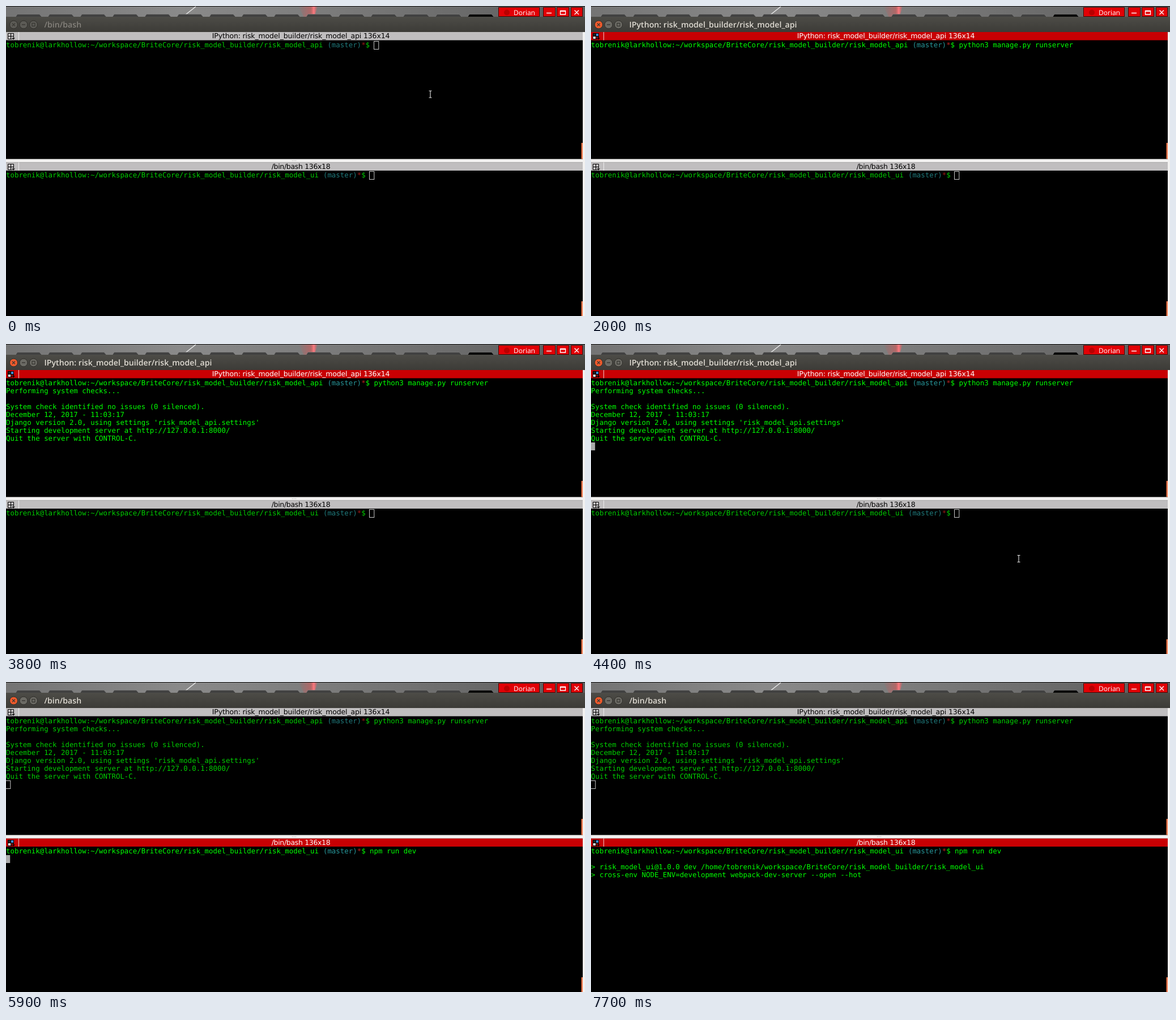
An HTML page for the animation above (8000 ms loop, 1022x548 px).

```html
<!DOCTYPE html>
<html lang="en">
<head>
<meta charset="utf-8">
<title>Two terminals</title>
<style>
  html, body { margin: 0; width: 100%; height: 100%; overflow: hidden; background: #000; }
  svg { display: block; width: 1022px; height: 548px; }
  text { white-space: pre; text-rendering: geometricPrecision; }

  .pane { --fg: #00cd00; --branch: #1f7a7c; --dirty: #a01818; --bar: #c0bebf; --ink: #000; --rule: #eee; }
  .pane.on { --fg: #00ff00; --branch: #27979a; --dirty: #c82020; --bar: #c80003; --ink: #fff; --rule: #f3c9c9; }
  .bar { fill: var(--bar); }
  .name { font: 12.44px "DejaVu Sans", sans-serif; fill: var(--ink); text-anchor: middle; }
  .term { font: 12.4px "DejaVu Sans Mono", monospace; fill: var(--fg); }
  .branch { fill: var(--branch); }
  .dirty { fill: var(--dirty); }
  .cursor { fill: #aaa; }
  .cursor.hollow { fill: none; stroke: #c8c8c8; }
  .cell { fill: none; stroke: #000; }
  .on .blue { fill: #3d8fe0; }
  .on .white { fill: #fff; }
  .on .dark { fill: #222; }

  #title { font: 600 14.15px "Open Sans", sans-serif; fill: #dfdbd2; }
  .button { fill: #6c6b65; stroke: #2f2e2a; }
  .glyph { fill: none; stroke: #3a3934; stroke-width: 1.3; }
  .close { fill: #ee5a2c; }
  .idle #title { fill: #85827c; }
  .idle .button { fill: #5c5b56; }
  .user { font: 12px "Open Sans", sans-serif; fill: #fff; }
</style>
</head>
<body>
<svg viewBox="0 0 1022 548">
  <defs>
    <linearGradient id="desk">
      <stop offset="0" stop-color="#747474"/>
      <stop offset=".3" stop-color="#8a8a8a"/>
      <stop offset=".55" stop-color="#7c7c7c"/>
      <stop offset="1" stop-color="#5c5c5c"/>
    </linearGradient>
    <linearGradient id="glow">
      <stop offset="0" stop-color="#d05050" stop-opacity="0"/>
      <stop offset=".65" stop-color="#d45a5a" stop-opacity=".6"/>
      <stop offset=".8" stop-color="#ff7a80"/>
      <stop offset="1" stop-color="#e05a60" stop-opacity=".1"/>
    </linearGradient>
    <linearGradient id="frame" x2="0" y2="1">
      <stop offset="0" stop-color="#4d4c47"/>
      <stop offset="1" stop-color="#3c3b37"/>
    </linearGradient>
  </defs>

  <rect width="1022" height="548" fill="#000"/>
  <rect width="1022" height="20" fill="url(#desk)"/>
  <rect width="1022" height="1" fill="#111"/>
  <path d="M516 1H550L544 20H526Z" fill="url(#glow)"/>
  <path d="M311 20L335 1" stroke="#eee" stroke-width="1.3"/>
  <g id="keys" stroke="#8c8c8c" stroke-width=".5"></g>

  <g fill="#e20006" stroke="#4a0000">
    <rect x="869.5" y="2.5" width="72" height="16"/>
    <rect x="948.5" y="2.5" width="21" height="16"/>
    <rect x="972.5" y="2.5" width="21" height="16"/>
    <rect x="997.5" y="2.5" width="20" height="16"/>
  </g>
  <circle cx="884" cy="11.5" r="5" fill="#b80000"/>
  <text class="user" x="896" y="16">Dorian</text>
  <path d="M954 12.5H963M978.5 8.5H987.5V15H978.5ZM978 9.2H988M1003.5 7.5L1011 15M1011 7.5L1003.5 15"
        fill="none" stroke="#fff" stroke-width="1.4"/>

  <g id="window">
    <rect y="19" width="1022" height="27" fill="url(#frame)"/>
    <circle id="close" class="button" cx="13.5" cy="33" r="7"/>
    <circle class="button" cx="31" cy="33" r="7"/>
    <circle class="button" cx="48.5" cy="33" r="7"/>
    <path class="glyph" d="M11 30.5L16 35.5M16 30.5L11 35.5M28 33H34M46 30.5H51V35.5H46Z"/>
    <text id="title" x="67.5" y="38"></text>
  </g>

  <g id="panes"></g>

  <path d="M1018 46H1022V548H1018ZM0 270.5H1022V276.5H0Z" fill="#f2f1f0"/>
  <path d="M505 273.5H513" stroke="#aaa" stroke-dasharray="1 1.5"/>
  <path d="M1015.5 242H1018V270.5H1015.5ZM1015.5 522H1018V548H1015.5Z" fill="#f0774a"/>

  <path id="mouse" d="M-2.5 -6H-.6L0 -5.4L.6 -6H2.5M0 -5.4V5.4M-2.5 6H-.6L0 5.4L.6 6H2.5"
        fill="none" stroke="#e6e6e6" stroke-width="1.1"/>
</svg>

<script>
const LOOP = 8000, CHAR = 7.466, ROW = 14;
const HOME = "/workspace/BriteCore/risk_model_builder/";
const API = "IPython: risk_model_builder/risk_model_api";
const $ = id => document.getElementById(id);

function add(parent, tag, attrs, text = "") {
  const el = document.createElementNS("http://www.w3.org/2000/svg", tag);
  for (const key in attrs) el.setAttribute(key, attrs[key]);
  el.textContent = text;
  return parent.appendChild(el);
}

// lines: [time, row, column, text]; cursor: [time, column, row, hollow], or [time] when hidden
const panes = [
  {
    bar: 46, top: 62, dir: "risk_model_api", name: API + " 136x14", spacing: -.115,
    focus: [500, 4600],
    lines: [
      [1400, 0, 87, "python3 manage.py runserver"],
      [3400, 1, 0, "Performing system checks..."],
      [3500, 3, 0, "System check identified no issues (0 silenced)."],
      [3500, 4, 0, "December 12, 2017 - 11:03:17"],
      [3500, 5, 0, "Django version 2.0, using settings 'risk_model_api.settings'"],
      [3500, 6, 0, "Starting development server at http://127.0.0.1:8000/"],
      [3500, 7, 0, "Quit the server with CONTROL-C."]
    ],
    cursor: [
      [0, 87, 0, true], [500, 87, 0], [1000], [1400, 114, 0], [2000], [2100, 0, 1], [2600],
      [3200, 0, 1], [3400, 0, 3], [3500, 0, 8], [3800], [4400, 0, 8], [4600, 0, 8, true]
    ]
  },
  {
    bar: 276.5, top: 292, dir: "risk_model_ui", name: "/bin/bash 136x18", spacing: -.3,
    focus: [4600, LOOP],
    lines: [
      [5300, 0, 86, "npm run dev"],
      [6500, 2, 0, "> risk_model_ui@1.0.0 dev /home/tobrenik" + HOME + "risk_model_ui"],
      [6500, 3, 0, "> cross-env NODE_ENV=development webpack-dev-server --open --hot"]
    ],
    cursor: [
      [0, 86, 0, true], [4600, 86, 0], [4900], [5300, 97, 0], [5900, 0, 1],
      [6500], [7100, 0, 5], [7700]
    ]
  }
];

// [time, x, y], or [time] when hidden
const mousePath = [
  [0, 749, 156], [800, 748, 152.5], [1000],
  [4000, 749, 195], [4100, 751, 260], [4200, 754, 330], [4300, 757, 370], [4400, 755, 379.5],
  [4800, 754.5, 376.5], [5300]
];

function buildPane(p) {
  const g = p.el = add($("panes"), "g", { class: "pane" });
  add(g, "rect", { class: "bar", y: p.bar, width: 1018, height: 14.5 });
  const icon = add(g, "g", { transform: `translate(3.5 ${Math.round(p.bar) + 2.5})` });
  add(icon, "path", { class: "cell dark", d: "M0 0H5V5H0Z" });
  add(icon, "path", { class: "cell blue", d: "M5 0H10V5H5Z" });
  add(icon, "path", { class: "cell white", d: "M0 5H5V10H0Z" });
  add(icon, "path", { class: "cell dark", d: "M5 5H10V8M5 5V10H7" });
  add(icon, "path", { d: "M6.5 8H12.5L9.5 11Z" });
  add(g, "path", { d: `M22.5 ${p.bar}v14.5`, style: "stroke:var(--rule)" });
  add(g, "text", { class: "name", x: 520.5, y: p.bar + 11.2, "letter-spacing": p.spacing }, p.name);

  const write = (row, col, text, kind = "") =>
    add(g, "text", { class: "term " + kind, x: col * CHAR, y: p.top + row * ROW + 11.2 }, text);
  const path = "tobrenik@larkhollow:~" + HOME + p.dir;
  const end = path.length;
  write(0, 0, path);
  write(0, end + 1, "(master)", "branch");
  write(0, end + 9, "*", "dirty");
  write(0, end + 10, "$");
  p.texts = p.lines.map(([time, row, col, text]) => ({ time, el: write(row, col, text) }));
  p.caret = add(g, "rect", { class: "cursor" });
}

function show(el, on) { el.setAttribute("visibility", on ? "visible" : "hidden"); }

function stateAt(steps, t) { return steps.filter(s => s[0] <= t).pop(); }

function drawPane(p, t) {
  p.el.classList.toggle("on", t >= p.focus[0] && t < p.focus[1]);
  for (const line of p.texts) show(line.el, t >= line.time);

  const [, col, row, hollow] = stateAt(p.cursor, t);
  show(p.caret, col !== undefined);
  if (col === undefined) return;
  const inset = hollow ? .5 : 0;
  p.caret.classList.toggle("hollow", !!hollow);
  p.caret.setAttribute("x", Math.round(col * CHAR) - inset);
  p.caret.setAttribute("y", p.top + row * ROW + inset);
  p.caret.setAttribute("width", hollow ? 8.3 : 7.2);
  p.caret.setAttribute("height", ROW);
}

function draw(t) {
  $("window").classList.toggle("idle", t < 500);
  $("close").classList.toggle("close", t >= 500);
  $("title").textContent = t >= 500 && t < 4600 ? API : "/bin/bash";
  for (const p of panes) drawPane(p, t);

  const [, x, y] = stateAt(mousePath, t);
  show($("mouse"), x !== undefined);
  if (x !== undefined) $("mouse").setAttribute("transform", `translate(${x} ${y})`);
}

for (let i = 0; i < 15; i++) {
  const x = 17 + i * 57;
  add($("keys"), "path", {
    d: `M${x} 19L${x + 3} 14.5H${x + 42}L${x + 46} 19`,
    fill: i === 14 ? "#080808" : "#414141"
  });
}
panes.forEach(buildPane);

const start = performance.now();
function tick() {
  draw((performance.now() - start) % LOOP);
  requestAnimationFrame(tick);
}
tick();
</script>
</body>
</html>
```
